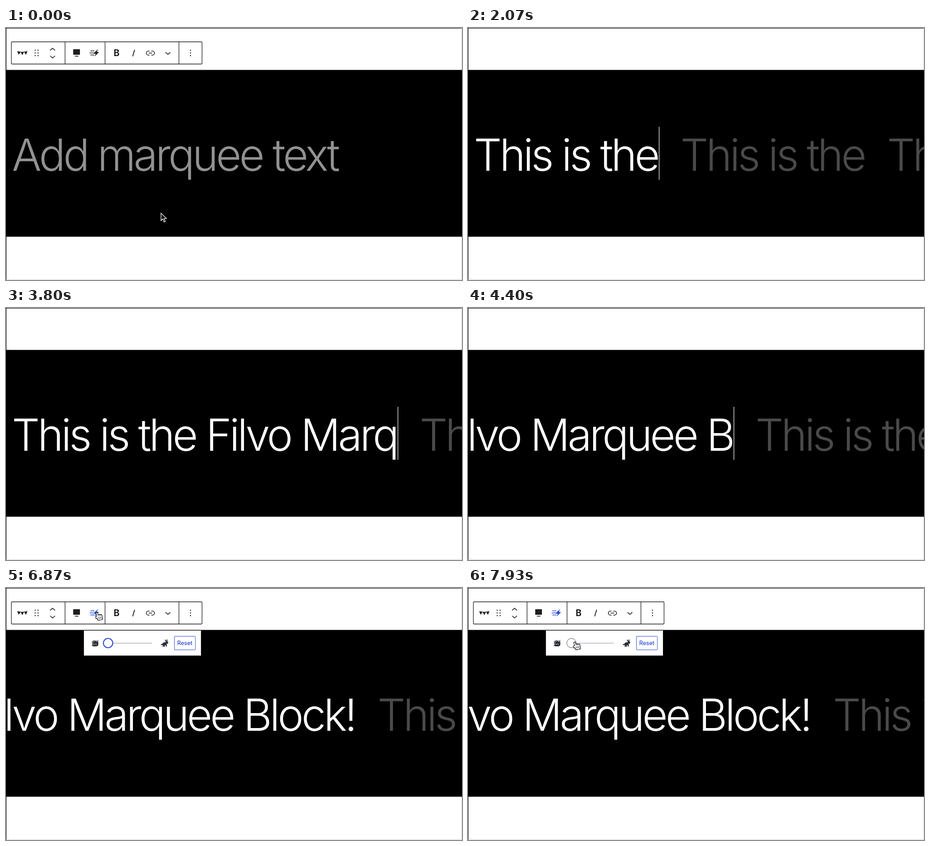
Write an HTML page with a canvas that moves like this. It is 1006x556 px and loops after 8 s.

```html
<!DOCTYPE html>
<html lang="en">
<head>
<meta charset="utf-8">
<title>Marquee editor</title>
<style>
  html, body { margin: 0; width: 100%; height: 100%; overflow: hidden; background: #fff; }
  canvas { display: block; }
</style>
</head>
<body>
<canvas id="stage" width="1006" height="556"></canvas>
<script>
const ctx = document.getElementById('stage').getContext('2d');
const LOOP = 8000;
const INK = '#1e1e1e', BLUE = '#2a48d0', HINT = '#4a4a4a', WHITE = '#fff';
const HEADLINE = '300 97px Inter, "Liberation Sans", sans-serif';
const PLACEHOLDER = 'Add marquee text';
const LEFT = 15, BASELINE = 314.5, GAP = 50;

// Each phrase is typed at an even pace between its first and last key.
const PHRASES = [
  { text: 'This ', first: 1070, last: 1470 },
  { text: 'is the ', first: 1600, last: 2130 },
  { text: 'Filvo ', first: 2330, last: 2800 },
  { text: 'Marquee ', first: 3330, last: 4200 },
  { text: 'Block!', first: 4400, last: 5070 }
];
const TYPING_START = PHRASES[0].first;
const TYPING_END = PHRASES.at(-1).last;
const MOUSE_BACK = 5730, POPOVER_OPEN = 6600, MARQUEE_START = 6690, SLIDER_PRESS = 7400;

// One tight tracking value for the whole headline, whichever cut of Inter is installed.
ctx.font = HEADLINE;
const tracking = (719 - ctx.measureText(PLACEHOLDER).width) / PLACEHOLDER.length;

function advance(text) {
  ctx.font = HEADLINE;
  return ctx.measureText(text).width + tracking * text.length;
}

const progress = (t, start, end) => Math.min(1, Math.max(0, (t - start) / (end - start)));
const mix = (a, b, p) => a + (b - a) * p;
const easeOut = p => 1 - (1 - p) ** 2;
const easeInOut = p => p * p * (3 - 2 * p);

function fill(d, color) {
  ctx.fillStyle = color;
  ctx.fill(new Path2D(d));
}
function stroke(d, color, width) {
  ctx.strokeStyle = color;
  ctx.lineWidth = width;
  ctx.stroke(new Path2D(d));
}
function rect(x, y, w, h, color) {
  ctx.fillStyle = color;
  ctx.fillRect(x, y, w, h);
}
function ellipse(x, y, rx, ry, color, angle = 0) {
  ctx.beginPath();
  ctx.ellipse(x, y, rx, ry, angle, 0, 2 * Math.PI);
  ctx.fillStyle = color;
  ctx.fill();
}
function panel(x, y, w, h, radius, color, width) {
  ctx.beginPath();
  ctx.roundRect(x, y, w, h, radius);
  ctx.fillStyle = WHITE;
  ctx.fill();
  ctx.strokeStyle = color;
  ctx.lineWidth = width;
  ctx.stroke();
}
function chevron(x, y, rise) {
  stroke(`M${x - 5.4} ${y}l5.4 ${rise} 5.4 ${-rise}`, INK, 1.6);
}
function label(text, x, y, font, color) {
  ctx.font = font + ' Inter, sans-serif';
  ctx.textAlign = 'center';
  ctx.fillStyle = color;
  ctx.fillText(text, x, y);
}
function headline(text, x, color) {
  ctx.font = HEADLINE;
  ctx.textAlign = 'left';
  ctx.letterSpacing = tracking + 'px';
  ctx.fillStyle = color;
  ctx.fillText(text, x - 2, BASELINE);
  ctx.letterSpacing = '0px';
}

function drawPage() {
  rect(0, 0, 1006, 556, '#d0d0d0');
  rect(0, 0, 1005, 555, '#000');
  rect(1, 1, 1004, 554, WHITE);
  rect(0, 92.5, 1006, 368, '#000');
}

function typedText(t) {
  return PHRASES.map(({ text, first, last }) => {
    const pace = (last - first) / (text.length - 1);
    return text.slice(0, Math.max(0, Math.floor((t - first) / pace + 1.001)));
  }).join('');
}

function caretVisible(t) {
  if (t < 330 || t >= POPOVER_OPEN) return false;
  if (t >= TYPING_START && t < TYPING_END) return true;
  const blinkStart = t < TYPING_START ? 330 : 5000;
  return (t - blinkStart) % 1060 < 530;
}

function drawMarquee(t) {
  const text = typedText(t);
  const width = advance(text);
  const [visible] = text.match(/.*Marquee/) || [];
  // Once the text outgrows the stage, the editor brings the caret to the middle.
  const scroll = visible ? LEFT + advance(visible) - 506 : 0;
  const drift = Math.max(0, t - MARQUEE_START) * 0.0138;
  const x = LEFT - scroll - drift;

  if (!text) headline(PLACEHOLDER, LEFT, '#929292');
  for (let copy = 0; text && copy < 3; copy++) {
    headline(text, x + copy * (width + GAP), copy ? HINT : WHITE);
  }
  if (caretVisible(t)) rect(Math.round(x + width), 218, 1.2, 117, WHITE);
}

function drawToolbar(speedColor) {
  panel(11.8, 30.5, 420.7, 49, 2, INK, 1.3);
  for (const x of [130.3, 218.5, 381.5]) stroke(`M${x} 30.5v49`, INK, 1.3);

  // bunting
  stroke('M25 51.5Q36 55 47 51.5', INK, 1.2);
  for (const side of [-1, 0, 1]) {
    const x = 36 + side * 7.5, y = 53 - Math.abs(side) * 0.7;
    fill(`M${x - 3.6} ${y}h7.2L${x + side * 0.3} ${y + 7}z`, INK);
  }

  // drag handle and overflow menu
  for (const y of [49, 55, 61]) {
    for (const x of [64.4, 70.8, 407]) rect(x - 1.1, y - 1.1, 2.2, 2.2, INK);
  }

  // movers and dropdown
  chevron(102.7, 49.3, -4.7);
  chevron(102.7, 61.5, 4.7);
  chevron(357.2, 53.6, 4.6);

  // alignment
  rect(148.3, 46.8, 14.8, 12.2, INK);
  rect(151.8, 61.4, 8, 1.6, INK);

  // speed
  for (const row of [0, 1, 2]) {
    stroke(`M${186 - row % 2 * 1.5} ${50.5 + row * 4.5}h9`, speedColor, 1.5);
  }
  fill('M203.5 46.3l-11 10 5.5.7-3 6.3 10.3-10-5-.7z', speedColor);

  label('B', 244, 62, '700 19.5px', INK);
  stroke('M283.8 48l-4.4 14.5', INK, 1.9);

  // link
  panel(309.6, 51, 18, 8.8, 4.4, INK, 1.6);
  rect(316.6, 50, 4, 11, WHITE);
  rect(314.8, 54.6, 7.8, 1.6, INK);
}

function drawSnail(color) {
  ellipse(196, 126.8, 7, 2, color);
  ellipse(201.8, 122.5, 2, 5, color);
  stroke('M201.5 119l-2-4M202.5 119l.6-4.5', color, 1);
  ellipse(195, 120.8, 5.4, 5.4, color);
  stroke('M198.3 122.5a3.6 3.6 0 1 1-2-5', WHITE, 0.8);
}

function drawRabbit(color) {
  ellipse(349.5, 123.5, 5.2, 3.6, color, -0.4);
  ellipse(355, 120.3, 3, 2.4, color, 0.4);
  ellipse(352.6, 116.5, 3.2, 1.1, color, 0.9);
  ellipse(355.4, 116, 3, 1, color, 1.5);
  ellipse(343.3, 124.8, 1.6, 1.4, color);
  ellipse(348, 128.4, 3, 1.2, color);
  ellipse(353.8, 126.5, 1.2, 3, color);
}

function drawPopover(drag, pressed) {
  panel(171.5, 93.5, 259, 56, 1, INK, 1);
  drawSnail('#2b2f36');
  drawRabbit('#2b2f36');

  ctx.lineCap = 'round';
  stroke('M226 121.8h94.5', '#d3d3dc', 3);
  ctx.lineCap = 'butt';
  const radius = 10.3;
  panel(225.2 + drag - radius, 121.5 - radius, radius * 2, radius * 2, radius,
    pressed ? '#4b5157' : BLUE, pressed ? 1 : 2.1);

  panel(371.5, 106.5, 46.3, 30, 1.5, BLUE, 1);
  label('Reset', 394.5, 126, '500 12.5px', BLUE);
}

function drawArrow(x, y, opacity) {
  const shape = 'M0 0v16.5l3.9-3.6 2.9 6.7 2.7-1.2-2.9-6.6H12z';
  ctx.save();
  ctx.translate(x, y);
  ctx.globalAlpha = opacity;
  fill(shape, '#000');
  stroke(shape, WHITE, 1.3);
  ctx.restore();
}

function drawHand(x, y) {
  ctx.save();
  ctx.translate(x, y);
  ctx.rotate(-0.22);
  // A dark, larger pass leaves an outline around the white one.
  for (const [color, grow] of [['#111', 0.6], [WHITE, -0.6]]) {
    const part = (px, py, w, h, r) => {
      ctx.beginPath();
      ctx.roundRect(px - grow, py - grow, w + 2 * grow, h + 2 * grow, r);
      ctx.fillStyle = color;
      ctx.fill();
    };
    part(-1.8, 0, 3.6, 12, 1.8);
    for (let finger = 1; finger < 4; finger++) part(finger * 2.8 - 1.8, 4.6 + finger * 0.7, 3.4, 8, 1.7);
    part(-4.6, 8, 4, 5, 2);
    part(-1.8, 9, 11.8, 9, 3.5);
  }
  for (let crease = 0; crease < 3; crease++) stroke(`M${1.8 + crease * 2.6} 11v4`, '#111', 0.9);
  ctx.restore();
}

function drawPointer(t, drag) {
  if (t < 270) return drawArrow(342, 408.5, 1 - progress(t, 60, 260));
  if (t < MOUSE_BACK) return;
  const toButton = easeOut(progress(t, 5700, 6330));
  const toSlider = easeInOut(progress(t, 6900, 7330));
  const x = mix(mix(322, 200, toButton), 232, toSlider) + drag;
  const y = mix(mix(306, 54, toButton), 119, toSlider);
  if (y < 80 || toSlider) drawHand(x, y);
  else drawArrow(x, y, 1);
}

function draw(now) {
  const t = now % LOOP;
  const popoverOpen = t >= POPOVER_OPEN;
  const drag = 3 * easeInOut(progress(t, 7600, 7930));
  drawPage();
  drawMarquee(t);
  if (t < TYPING_START || t >= MOUSE_BACK) drawToolbar(popoverOpen ? BLUE : INK);
  if (popoverOpen) drawPopover(drag, t >= SLIDER_PRESS);
  drawPointer(t, drag);
  requestAnimationFrame(draw);
}
requestAnimationFrame(draw);
</script>
</body>
</html>
```
